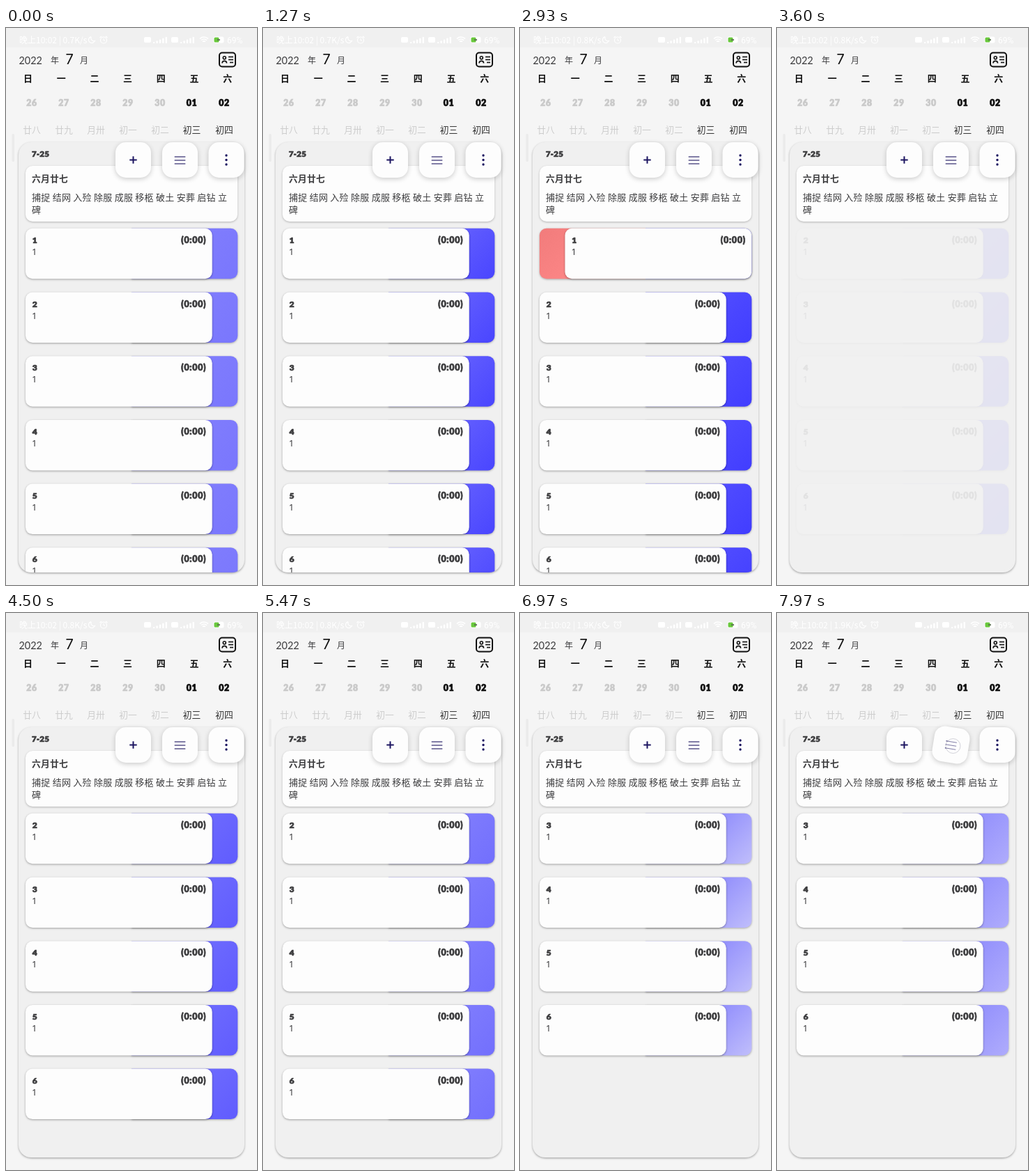
An HTML page with a canvas for the animation above (8000 ms loop, 360 by 800 pixels).

```html
<!DOCTYPE html>
<html lang="zh">
<head>
<meta charset="utf-8">
<style>
html, body { margin: 0; width: 100%; height: 100%; overflow: hidden; background: #f5f5f5; }
canvas { display: block; width: 360px; height: 800px; }
</style>
</head>
<body>
<canvas id="stage"></canvas>
<script>
const LOOP = 8000;
const dpr = window.devicePixelRatio || 1;
const canvas = document.getElementById('stage');
canvas.width = 360 * dpr;
canvas.height = 800 * dpr;
const ctx = canvas.getContext('2d');

const CJK = '"Noto Sans CJK SC", "Noto Sans CJK", sans-serif';
const PANEL = '#f0f0f0', INK = '#3c3c3e', NAVY = '#1c1560';
const COLS = [37, 83, 129, 175, 221, 266.5, 313];

// time, tint at the top left, tint at the bottom right (0 deep, 1 pale)
const TINTS = [
  [0, .47, .43], [1270, .22, .07], [2300, .08, .02], [2930, .1, 0],
  [5470, .46, .38], [6970, .64, .95], [7970, .64, .82], [8000, .64, .82]
];

const clamp = v => Math.max(0, Math.min(1, v));
const ease = v => v * v * (3 - 2 * v);
const part = (t, from, to) => clamp((t - from) / (to - from));
const mix = (a, b, k) => a + (b - a) * k;

function text(str, x, y, font, color, align = 'left', spacing = 0) {
  ctx.font = font;
  ctx.fillStyle = color;
  ctx.textAlign = align;
  ctx.letterSpacing = spacing + 'px';
  ctx.fillText(str, x, y);
}

// extra heavy numerals: the outline thickens the boldest cut
function heavy(str, x, y, size, color, align = 'left', spacing = .6) {
  text(str, x, y, `900 ${size}px Lato, sans-serif`, color, align, spacing);
  ctx.lineWidth = .7;
  ctx.lineJoin = 'round';
  ctx.strokeStyle = color;
  ctx.strokeText(str, x, y);
}

function path(x, y, w, h, r) {
  ctx.beginPath();
  ctx.roundRect(x, y, w, h, r);
}

function box(x, y, w, h, r, fill) {
  path(x, y, w, h, r);
  ctx.fillStyle = fill;
  ctx.fill();
}

function raised(x, y, w, h, r, fill, blur, dy, alpha) {
  ctx.save();
  ctx.shadowColor = `rgba(0,0,0,${alpha})`;
  ctx.shadowBlur = blur * dpr;
  ctx.shadowOffsetY = dy * dpr;
  box(x, y, w, h, r, fill);
  ctx.restore();
}

function line(x1, y1, x2, y2, width, color) {
  ctx.beginPath();
  ctx.moveTo(x1, y1);
  ctx.lineTo(x2, y2);
  ctx.lineWidth = width;
  ctx.strokeStyle = color;
  ctx.stroke();
}

function disc(x, y, r, fill) {
  ctx.beginPath();
  ctx.arc(x, y, r, 0, 7);
  ctx.fillStyle = fill;
  ctx.fill();
}

function ring(x, y, r, width, color, from = 0, to = 7) {
  ctx.beginPath();
  ctx.arc(x, y, r, from, to);
  ctx.lineWidth = width;
  ctx.strokeStyle = color;
  ctx.stroke();
}

function signal(x) {
  box(x - 13, 13, 10, 8, 2, '#fff');
  for (let i = 0; i < 5; i++) box(x + i * 4.4, 20 - i * 1.8, 2.4, 2 + i * 1.8, 1, '#fff');
}

function statusBar(t) {
  box(0, 0, 360, 28, 0, '#f0f0f0');
  const rate = t < 1600 ? '0.7' : t < 6180 ? '0.8' : '1.9';
  text(`晚上10:02 | ${rate}K/s`, 19, 22, `12px ${CJK}`, '#fff');
  ring(123, 17, 4.5, 1.1, '#fff', .2, 4.5);
  ring(126, 14.5, 4.2, 1.1, '#fff', 1, 3.6);
  ring(140, 17.5, 4.5, 1.1, '#fff');
  line(140, 15, 140, 18, 1, '#fff');
  line(140, 18, 142, 18, 1, '#fff');
  line(134.5, 14, 137, 12, 1.2, '#fff');
  line(145.5, 14, 143, 12, 1.2, '#fff');
  signal(211);
  signal(250);
  for (let r = 3; r < 11; r += 3) ring(284, 22, r, 1.6, '#fff', -2.3, -.84);
  box(297.5, 12.5, 15, 9, 2.5, '#fff');
  box(298.5, 13.5, 7, 7, 1.5, '#69c83c');
  line(303, 17, 307, 17, 1.6, '#55604f');
  text('69%', 317, 21.5, '12px Roboto, sans-serif', '#fff');
}

function calendar() {
  text('2022', 18.5, 51.5, '14.4px Lato, sans-serif', INK);
  text('年', 64, 50.5, `12px ${CJK}`, INK);
  text('7', 85.5, 51.8, '20px Inter, sans-serif', '#111');
  text('月', 106, 50.5, `12px ${CJK}`, INK);

  path(306, 35.5, 23, 20, 4);
  ctx.lineWidth = 2;
  ctx.strokeStyle = '#111';
  ctx.stroke();
  ring(313.3, 42.7, 2, 1.6, '#111');
  ring(313.3, 50.5, 3.2, 1.7, '#111', Math.PI, 2 * Math.PI);
  line(319, 41.5, 326, 41.5, 1.6, '#111');
  line(319, 45.5, 326, 45.5, 1.6, '#111');
  line(321, 49.5, 326, 49.5, 1.6, '#111');

  const lunar = ['廿八', '廿九', '月卅', '初一', '初二', '初三', '初四'];
  const dates = ['26', '27', '28', '29', '30', '01', '02'];
  [...'日一二三四五六'].forEach((day, i) => {
    const on = i > 4;
    text(day, 31.5 + i * 47.7, 76.6, `bold 13px ${CJK}`, '#111', 'center');
    heavy(dates[i], COLS[i], 112, 12.3, on ? '#0c0c0c' : '#c9c9c9', 'center');
    text(lunar[i], COLS[i], 150.6, `12.8px ${CJK}`, on ? '#333' : '#cdcdcd', 'center');
  });
  box(8.5, 152, 3.5, 40, 1.5, '#ebebeb');
}

function panel() {
  raised(18, 164, 324, 618, 18, PANEL, 3, 1.2, .34);
  heavy('7-25', 37, 185.3, 11.5, INK, 'left', .2);
  raised(28, 198, 304, 80, 10, '#fdfdfd', 3, 1, .25);
  text('六月廿七', 37, 221, `bold 12.8px ${CJK}`, INK, 'left', .2);
  text('捕捉 结网 入殓 除服 成服 移柩 破土 安葬 启钻 立', 37, 248, `13px ${CJK}`, INK, 'left', .25);
  text('碑', 37, 265.8, `13px ${CJK}`, INK);
}

function tint(level) {
  return `rgb(${mix(66, 196, level)},${mix(62, 194, level)},${mix(255, 251, level)})`;
}

function tintsAt(t) {
  const i = Math.max(1, TINTS.findIndex(key => key[0] > t));
  const a = TINTS[i - 1], b = TINTS[i];
  const k = part(t, a[0], b[0]);
  return [tint(mix(a[1], b[1], k)), tint(mix(a[2], b[2], k))];
}

function slant(x, y, from, to) {
  const g = ctx.createLinearGradient(x, y + 12, x + 50, y + 60);
  g.addColorStop(0, from);
  g.addColorStop(1, to);
  return g;
}

function item(n, y, shift, tints) {
  const h = 72.5;
  if (shift > 0) {
    raised(28, y, 152, h, [10, 0, 0, 10], slant(22, y, '#f27c7c', '#fb8585'), 3, 1, .3);
  }
  raised(180, y, 152.3, h, [0, 10, 10, 0], slant(287, y, ...tints), 3, 1, .3);
  const x = 28 + 36.5 * shift;
  raised(x, y, 267.7, h, 10, '#fdfdfd', 3, 1, .34);
  heavy(n, x + 9.7, y + 21, 12, INK);
  heavy('(0:00)', x + 259.3, y + 21, 12.3, INK, 'right', .75);
  text('1', x + 9, y + 38, '13px "Noto Sans", sans-serif', INK);
}

function list(t) {
  const first = t < 3560 ? 1 : t < 6290 ? 2 : 3;
  const shift = t < 3560 ? ease(part(t, 1500, 1850)) : 0;
  const shown = first === 1 ? 1 : part(t, first === 2 ? 3570 : 6300, first === 2 ? 3970 : 6700);
  const tints = tintsAt(t);

  ctx.save();
  path(18, 164, 324, 618, 18);
  ctx.clip();
  for (let n = first; n <= 6; n++) {
    const row = n - first;
    item(n, 287.8 + row * 91.7, row ? 0 : shift, tints);
  }
  if (shown < 1) {
    ctx.globalAlpha = 1 - shown;
    box(21, 283, 318, 496, [0, 0, 16, 16], PANEL);
  }
  ctx.restore();
}

function button(cx, angle, icon) {
  ctx.save();
  ctx.translate(cx, 189.5);
  ctx.rotate(angle);
  raised(-25.5, -25.5, 51, 51, 15, '#fdfdfd', 7, 2, .2);
  icon();
  ctx.restore();
}

function buttons(t) {
  button(182.5, 0, () => {
    line(-5.2, 0, 5.2, 0, 2, NAVY);
    line(0, -5.2, 0, 5.2, 2, NAVY);
  });
  button(249.5, part(t, 7860, 7970) * .16, () => {
    for (let y = -4.5; y <= 5.5; y += 5) line(-7.8, y, 7.8, y, 1.1, NAVY);
  });
  button(316, 0, () => {
    for (let y = -6.5; y <= 6.5; y += 6.5) disc(0, y, 1.7, NAVY);
  });
  if (t >= 7800) {
    disc(252.5, 191, 10.5, 'rgba(255,255,255,.45)');
    ring(252.5, 191, 10.5, 1, 'rgba(130,130,150,.35)');
  }
}

function draw(t) {
  ctx.setTransform(dpr, 0, 0, dpr, 0, 0);
  box(0, 0, 360, 800, 0, '#f5f5f5');
  statusBar(t);
  calendar();
  panel();
  list(t);
  buttons(t);
}

const start = performance.now();
function tick() {
  draw((performance.now() - start) % LOOP);
  requestAnimationFrame(tick);
}
tick();
</script>
</body>
</html>
```
